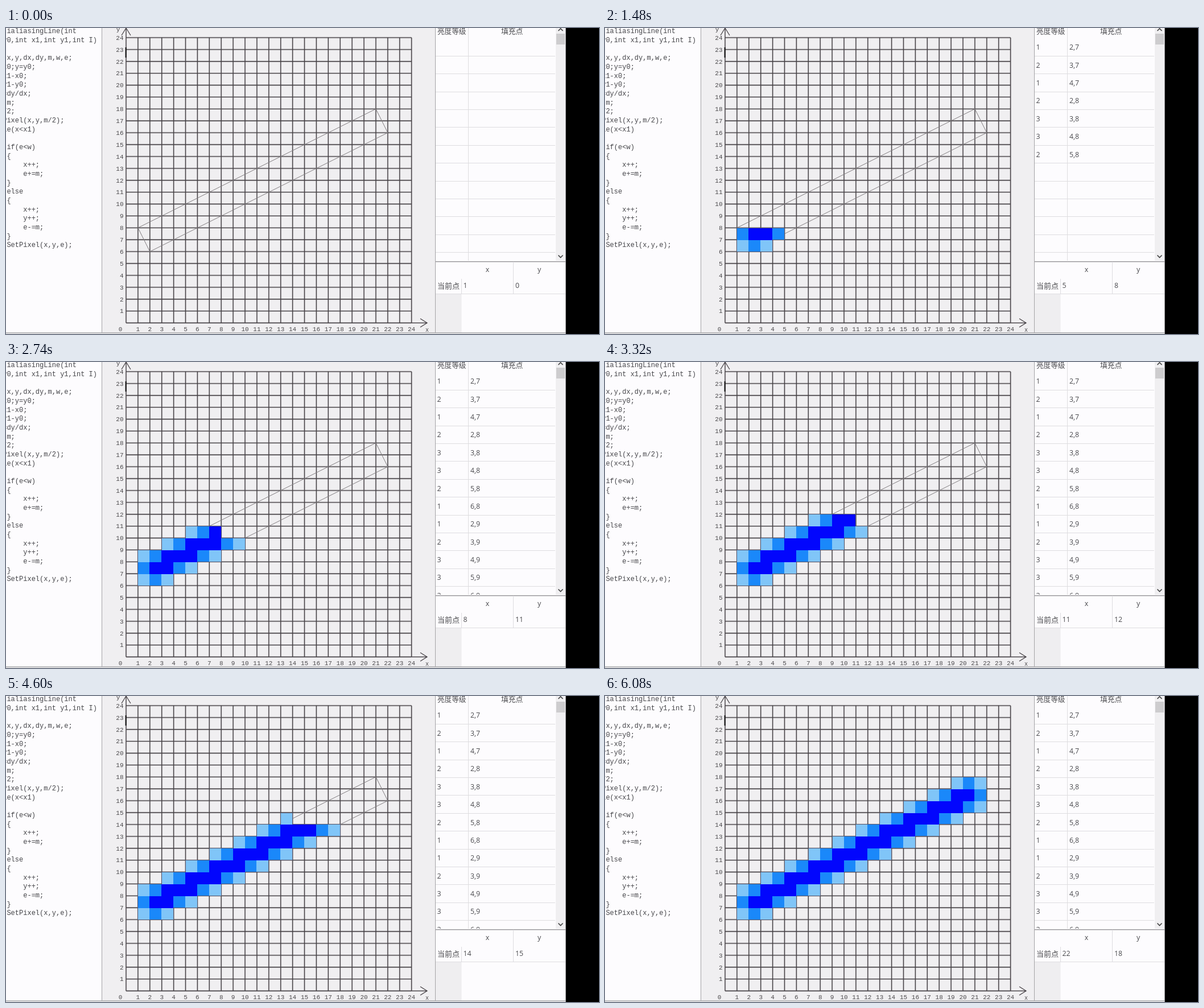
Recreate the animation shown at these times as an HTML page with a canvas. Size 1042x538 px, loop 7120 ms.

```html
<!DOCTYPE html>
<html lang="zh">
<head>
<meta charset="utf-8">
<title>Antialiased line fill</title>
<style>
html, body { margin: 0; width: 100%; height: 100%; overflow: hidden; background: #000; }
canvas { display: block; width: 1042px; height: 538px; }
</style>
</head>
<body>
<canvas id="stage" width="1042" height="538"></canvas>
<script>
const ctx = document.getElementById('stage').getContext('2d');

const LOOP = 7120, FILL_START = 1000, FILL_STEP = 70.9;
const COUNT = 24, LEFT = 211, BOTTOM = 518.5, STEP = 20.9;
const ROW = 31.37;
const LEVEL_COLORS = ['', '#80c5f8', '#1a88fa', '#0206fd'];
const MONO = '"Liberation Mono", monospace';
const SANS = '"Open Sans", sans-serif';
const CJK = '"Noto Sans CJK SC", "Noto Sans CJK", sans-serif';

// Each entry: [column of the first character, text]; column 0 is the left edge of the panel.
const CODE = [
  [-2, 'ntialiasingLine(int'], [-1, 'y0,int x1,int y1,int I)'], [0, ''],
  [0, 'x,y,dx,dy,m,w,e;'], [-1, 'x0;y=y0;'], [-1, 'x1-x0;'], [-1, 'y1-y0;'],
  [-1, '=dy/dx;'], [-1, '-m;'], [-1, '/2;'], [-1, 'Pixel(x,y,m/2);'],
  [-1, 'le(x<x1)'], [0, ''], [0, 'if(e<w)'], [0, '{'], [4, 'x++;'],
  [4, 'e+=m;'], [0, '}'], [0, 'else'], [0, '{'], [4, 'x++;'], [4, 'y++;'],
  [4, 'e-=m;'], [0, '}'], [0, 'SetPixel(x,y,e);']
];

const gridX = i => LEFT + i * STEP;
const gridY = i => BOTTOM - i * STEP;

function buildCells() {
  const cells = [];
  for (let y = 7; y <= 18; y++) {
    const first = 2 * y - 16;
    for (let x = Math.max(2, first); x <= Math.min(22, first + 6); x++) {
      const i = x - first;
      let level = Math.min(3, i + 1, 7 - i);
      if (x === 2) level = Math.min(level, y - 6);
      if (x === 22) level = Math.min(level, 19 - y);
      cells.push({ x, y, level });
    }
  }
  return cells;
}
const cells = buildCells();

function rect(x, y, w, h, color) {
  ctx.fillStyle = color;
  ctx.fillRect(x, y, w, h);
}

function path(points, color, width = 1, close = false) {
  ctx.beginPath();
  points.forEach(([x, y]) => ctx.lineTo(x, y));
  if (close) ctx.closePath();
  ctx.strokeStyle = color;
  ctx.lineWidth = width;
  ctx.stroke();
}

// A dark line with a faint soft edge.
function softLine(points) {
  path(points, 'rgba(64, 60, 64, 0.14)', 3);
  path(points, '#454145', 1.35);
}

// The y value is the visual middle of the line of text.
function label(text, x, y, size, family, color = '#4a4a4e', align = 'left') {
  ctx.font = `${size}px ${family}`;
  ctx.textAlign = align;
  ctx.fillStyle = color;
  ctx.fillText(text, x, y + size * (family === CJK ? 0.38 : 0.35));
}

function drawCode() {
  rect(0, 0, 168, 536, '#fdfcfe');
  CODE.forEach(([col, text], i) =>
    label(text, 1.4 + col * 7.21, 5 + i * 15.67, 12.02, MONO, '#46464a'));
}

function drawGrid() {
  const ink = '#403c40', textInk = '#4c4a4d';
  for (let i = 0; i <= COUNT; i++) {
    softLine([[gridX(i), gridY(0)], [gridX(i), gridY(COUNT)]]);
    softLine([[gridX(0), gridY(i)], [gridX(COUNT), gridY(i)]]);
    if (i) {
      label(i, 206.5, gridY(i), 11, MONO, textInk, 'right');
      label(i, gridX(i), 529.5, 11, MONO, textInk, 'center');
    }
  }
  path([[LEFT, gridY(COUNT)], [LEFT, 0]], ink, 1.4);
  path([[gridX(COUNT), BOTTOM], [739, BOTTOM]], ink, 1.4);
  path([[203, 13], [LEFT, 0], [219, 13]], ink, 1.2);
  path([[728, 511], [740, BOTTOM], [728, 526]], ink, 1.2);
  path([[210.6, 34], [210.6, 52]], '#111', 2);
  label('0', 201, 529.5, 11, MONO, textInk, 'center');
  label('y', 197, 2, 11, MONO, textInk, 'center');
  label('x', 740, 530, 10, MONO, textInk, 'center');
  const corners = [[1, 8], [21, 18], [22, 16], [2, 6]];
  path(corners.map(([x, y]) => [gridX(x), gridY(y)]), '#827e81', 1, true);
}

function drawCells(count) {
  const shown = cells.slice(0, count);
  const isFilled = (x, y) => shown.some(c => c.x === x && c.y === y);
  const boxes = shown.map(({ x, y, level }) => ({
    x, y, level,
    left: Math.floor(gridX(x - 1)), right: Math.floor(gridX(x)),
    top: Math.floor(gridY(y)), bottom: Math.floor(gridY(y - 1))
  }));
  for (const b of boxes) {
    rect(b.left, b.top, b.right - b.left + 1, b.bottom - b.top + 1, LEVEL_COLORS[b.level]);
  }
  // The grid stays visible around the outside of the filled area.
  const edge = '#55556a';
  for (const { x, y, left, right, top, bottom } of boxes) {
    const w = right - left + 1, h = bottom - top + 1;
    if (!isFilled(x - 1, y)) rect(left, top, 1, h, edge);
    if (!isFilled(x + 1, y)) rect(right, top, 1, h, edge);
    if (!isFilled(x, y + 1)) rect(left, top, w, 1, edge);
    if (!isFilled(x, y - 1)) rect(left, bottom, w, 1, edge);
  }
}

function drawTable(count) {
  rect(755, 0, 229, 536, '#fdfcfe');
  ctx.save();
  ctx.beginPath();
  ctx.rect(755, 0, 211, 409);
  ctx.clip();
  path([[812.5, 0], [812.5, 409]], '#dedde0');
  for (let i = 0; i < 12; i++) {
    const y = Math.round(49 + i * ROW) + 0.5;
    path([[755, y], [965, y]], '#dedde0');
  }
  cells.slice(0, Math.min(count, 13)).forEach(({ x, y, level }, i) => {
    const mid = 34 + i * ROW;
    label(level, 757.5, mid, 12.3, SANS);
    label(`${x},${y}`, 816, mid, 12.3, SANS);
  });
  label('亮度等级', 758, 5, 12.6, CJK);
  label('填充点', 870, 5, 12.8, CJK);
  ctx.restore();

  rect(966, 0, 17, 409, '#f0eff1');
  rect(967, 10, 15, 19, '#cdccce');
  path([[970.5, 5], [974.5, 1], [978.5, 5]], '#444', 1.7);
  path([[970.5, 399.5], [974.5, 403.5], [978.5, 399.5]], '#444', 1.7);
}

function drawCurrentPoint(point) {
  rect(755, 410, 229, 1.5, '#9d9c9f');
  rect(755, 468, 45.5, 68, '#efeef0');
  path([[755, 467.5], [983, 467.5]], '#dedde0');
  path([[800.5, 441], [800.5, 467]], '#dedde0');
  path([[891.5, 411], [891.5, 467]], '#dedde0');
  label('x', 846, 424.5, 12.3, SANS, '#4a4a4e', 'center');
  label('y', 937, 424.5, 12.3, SANS, '#4a4a4e', 'center');
  label('当前点', 758, 453, 13, CJK);
  label(point.x, 803.5, 452.5, 12.3, SANS);
  label(point.y, 895, 452.5, 12.3, SANS);
}

function draw(time) {
  const t = time % LOOP;
  const count = t < FILL_START ? 0
    : Math.min(cells.length, Math.floor((t - FILL_START) / FILL_STEP) + 1);
  rect(0, 0, 984, 538, '#f0eff1');
  drawCode();
  drawGrid();
  drawCells(count);
  drawTable(count);
  drawCurrentPoint(count ? cells[count - 1] : { x: 1, y: 0 });
  path([[168.5, 0], [168.5, 536]], '#a5a4a7');
  path([[754.5, 0], [754.5, 536]], '#a5a4a7');
  path([[0, 536], [984, 536]], '#a9a8ab', 1.5);
  rect(983, 0, 1, 538, '#8a898c');
  rect(984, 0, 58, 538, '#000');
}

const start = performance.now();
function tick() {
  draw(performance.now() - start);
  requestAnimationFrame(tick);
}
tick();
</script>
</body>
</html>
```
